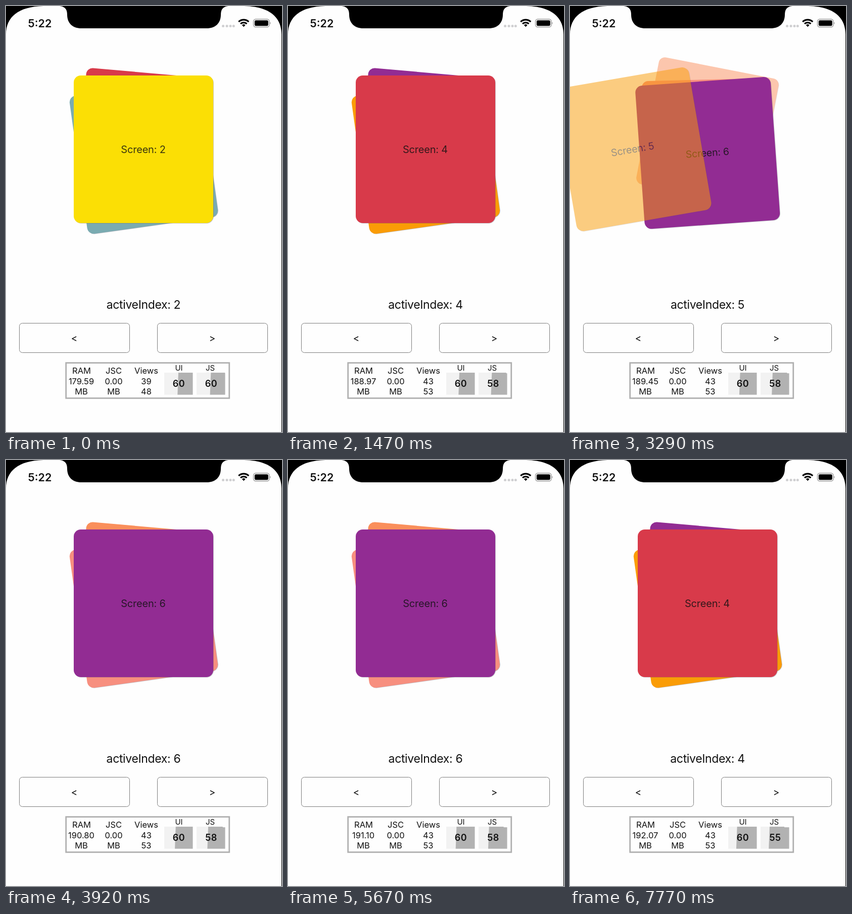
An HTML page that plays this animation: 546x840 px, repeating every 7840 ms.

```html
<!DOCTYPE html>
<html lang="en">
<head>
<meta charset="utf-8">
<title>Card stack</title>
<style>
  html, body { margin: 0; width: 100%; height: 100%; overflow: hidden; background: #fefefe; }
  svg { display: block; width: 546px; height: 840px; }
  text { font-family: Inter, Roboto, sans-serif; text-anchor: middle; fill: #111; }
  .stat { font-size: 16.5px; }
  .label { font-size: 15px; }
  .fps { font-size: 18px; font-weight: 600; letter-spacing: .5px; }
  .button { fill: #fefefe; stroke: #7d7d7d; stroke-width: 1; }
</style>
</head>
<body>
<svg id="stage" viewBox="0 0 546 840">
  <rect width="546" height="840" fill="#fefefe"/>
  <g id="cards"></g>

  <path d="M0 0H74C24 1 0 22 0 56Z"/>
  <path d="M546 0H471C521 1 545 22 545 56V840H546Z"/>
  <path d="M70 0H476V0H440C430 1 425 6 425 17C425 34 414 44 397 44H149C132 44 121 34 121 17C121 6 116 1 106 0Z"/>
  <text x="67" y="41.5" font-size="21.5" font-weight="600">5:22</text>
  <g id="dots" fill="#cfcfd1"></g>
  <g fill="none" stroke="#000" stroke-width="3.2">
    <path d="M460.2 31.2A14.5 14.5 0 0 1 480.2 31.2"/>
    <path d="M464 35.2A9 9 0 0 1 476.4 35.2"/>
  </g>
  <path d="M466.8 37.6A5 5 0 0 1 473.6 37.6L470.2 41.2Z"/>
  <rect x="489.5" y="26" width="31.5" height="15.5" rx="4.5" fill="none" stroke="#9a9a9a" stroke-width="1.4"/>
  <rect x="491.8" y="28.2" width="27" height="11" rx="2.6"/>
  <path d="M522.3 31.2Q525 33.7 522.3 36.3Z" fill="#9a9a9a"/>

  <text id="active" x="272" y="596.5" font-size="23" letter-spacing="-.35"></text>
  <rect class="button" x="26.5" y="625.5" width="218" height="58" rx="6"/>
  <rect class="button" x="299.5" y="625.5" width="218" height="58" rx="6"/>
  <text x="135" y="662" font-size="19">&lt;</text>
  <text x="408" y="662" font-size="19">&gt;</text>

  <rect x="118.7" y="703.7" width="323" height="69.6" fill="#fefefe" stroke="#b0b0b0" stroke-width="2.8"/>
  <g class="stat">
    <text x="149.5" y="724.5">RAM</text>
    <text id="ram" x="149" y="745.5"></text>
    <text x="149" y="766">MB</text>
    <text x="213" y="724.5">JSC</text>
    <text x="213" y="745.5">0.00</text>
    <text x="213" y="766">MB</text>
    <text x="277.5" y="724.5">Views</text>
    <text id="views" x="277.5" y="745.5"></text>
    <text id="nodes" x="277.5" y="766"></text>
  </g>
  <text class="label" x="342" y="719">UI</text>
  <text class="label" x="404" y="719">JS</text>
  <path d="M313 723H369.5V766.5H313ZM377 723H433.5V766.5H377Z" fill="#f2f2f2"/>
  <path id="graphs" fill="#b2b2b2"/>
  <path id="dip" fill="#fefefe"/>
  <text class="fps" x="342" y="751">60</text>
  <text id="jsFps" class="fps" x="406" y="751"></text>
</svg>
<script>
const LOOP = 7840, MOVE = 430, FIRST = 2;
const W = 276, H = 291;
const colors = ['#fbdf05', '#7aabb1', '#d83a4a', '#fa9c06', '#922c93', '#f78f7f', '#fa8f5b', '#8ffde0'];
const moves = [[110, 1], [880, 1], [2076, 1], [3078, 1], [4263.5, 1], [5090, -1], [6270, -1], [6710, -1]];
const ramSteps = [[0, '179.59'], [420, '185.14'], [980, '188.97'], [2800, '189.45'], [3800, '190.80'],
  [5200, '191.10'], [6500, '191.62'], [7100, '192.07']];

// Pose of a card by its distance from the active one.
const poses = [
  { slot: -1, x: -28, y: 282.5, turn: -19.8, scale: .96, alpha: 0 },
  { slot: 0, x: 272, y: 282.5, turn: 0, scale: 1, alpha: 1 },
  { slot: 1, x: 272.4, y: 296.5, turn: -8, scale: .945, alpha: 1 },
  { slot: 2, x: 272, y: 262.7, turn: 5, scale: .9, alpha: 1 },
  { slot: 3, x: 272, y: 232, turn: 17, scale: .85, alpha: 0 }
];

const $ = id => document.getElementById(id);
const svg = (name, attrs, parent) => {
  const node = document.createElementNS('http://www.w3.org/2000/svg', name);
  for (const key in attrs) node.setAttribute(key, attrs[key]);
  return parent.appendChild(node);
};
const clamp = v => Math.max(0, Math.min(1, v));
const ease = v => v * v * (3 - 2 * v);
const latest = (steps, t) => steps.filter(s => s[0] <= t).pop()[1];

function poseAt(slot) {
  const i = Math.max(0, Math.min(3, Math.floor(slot) + 1));
  const a = poses[i], b = poses[i + 1], k = slot - a.slot;
  const mix = key => a[key] + (b[key] - a[key]) * k;
  return { x: mix('x'), y: mix('y'), turn: mix('turn'), scale: mix('scale'), alpha: mix('alpha') };
}

[429.5, 437, 444, 450.3].forEach(x => svg('circle', { cx: x, cy: 39.6, r: 2.5 }, $('dots')));

const cards = colors.map((fill, i) => ({ fill, index: i + FIRST })).reverse().map(card => {
  const node = svg('g', {}, $('cards'));
  const box = { x: -W / 2, y: -H / 2, width: W, height: H, rx: 14 };
  svg('rect', { ...box, fill: '#55506a', 'fill-opacity': .4, transform: 'translate(.8 .8)' }, node);
  svg('rect', { ...box, fill: card.fill }, node);
  svg('text', { x: -.5, y: 7, 'font-size': 20, 'letter-spacing': -.2, 'fill-opacity': .82 }, node)
    .textContent = 'Screen: ' + card.index;
  return { node, index: card.index };
});

function render(t) {
  const position = moves.reduce((p, [start, dir]) => p + dir * ease(clamp((t - start) / MOVE)), FIRST);
  for (const { node, index } of cards) {
    const slot = index - position;
    const shown = slot > -1 && slot < 3;
    node.setAttribute('display', shown ? 'inline' : 'none');
    if (!shown) continue;
    const p = poseAt(slot);
    node.setAttribute('transform', `translate(${p.x} ${p.y}) rotate(${p.turn}) scale(${p.scale})`);
    node.setAttribute('opacity', p.alpha);
  }
  $('active').textContent = 'activeIndex: ' + Math.round(position - .02);
  $('ram').textContent = latest(ramSteps, t);
  $('views').textContent = t < 600 ? 39 : 43;
  $('nodes').textContent = t < 600 ? 48 : 53;
  $('jsFps').textContent = latest([[0, 60], [700, 58], [6500, 55]], t);

  const shift = 10.5 * t / LOOP;
  const graph = (left, right) => `M${left - shift} 723H${right}V766.5H${left - 1.7 - shift}Z`;
  $('graphs').setAttribute('d', graph(341, 369.5) + graph(405.3, 433.5));
  const dip = t < 700 ? 0 : 9.5 * t / LOOP;
  $('dip').setAttribute('d', `M${433.5 - dip} 722.5H434V724.2H${433.5 - dip}Z`);
}

const begin = performance.now();
function tick() {
  render((performance.now() - begin) % LOOP);
  requestAnimationFrame(tick);
}
tick();
</script>
</body>
</html>
```
